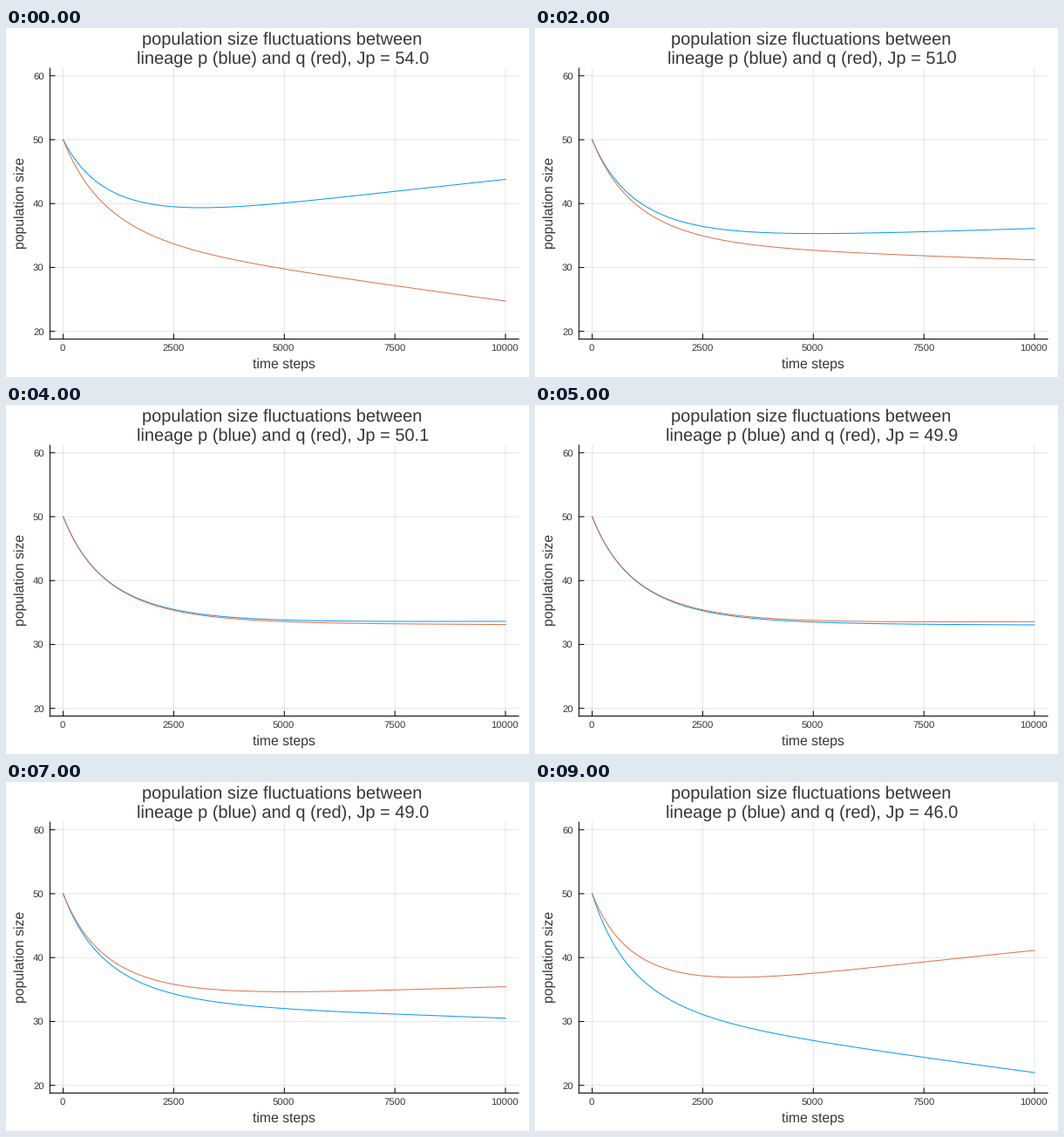
Write a matplotlib script that moves like this. It is 600 px wide and 400 px high and loops after 10000 ms.

```python
import numpy as np
import matplotlib as mpl
import matplotlib.pyplot as plt
from matplotlib.animation import FuncAnimation

mpl.rcParams["font.family"] = "Liberation Sans"
mpl.rcParams["text.hinting"] = "none"

W, H, DPI = 600, 400, 100
PT = 72 / DPI                      # points per pixel
LEFT, RIGHT, TOP, BOTTOM = 50.4, 588.2, 46, 356.5
INK = "#363636"
BLUE, RED = "#009AFA", "#E36F47"

STEPS = 10000
RATE = 7e-4
JQ = 50
JP = np.array([54, 52, 51, 50.5, 50.1, 49.9, 49.5, 49, 48, 46])


def sx(t):
    return 65.6 + 507.4 * np.asarray(t) / STEPS


def sy(n):
    return 128 + (50 - np.asarray(n)) * (BOTTOM - TOP) / 42.4


def simulate():
    """Competing lineages p and q, one column per value of Jp."""
    p = np.full((STEPS + 1, len(JP)), 50.0)
    q = p.copy()
    for i in range(STEPS):
        a, b = p[i], q[i]
        load = a + b - a * b / (a + b)
        p[i + 1] = a + RATE * a * (1 - load / JP)
        q[i + 1] = b + RATE * b * (1 - load / JQ)
    return p[::20], q[::20]


fig = plt.figure(figsize=(W / DPI, H / DPI), dpi=DPI, facecolor="white")
ax = fig.add_axes([0, 0, 1, 1])
ax.set_xlim(0, W)
ax.set_ylim(H, 0)
ax.axis("off")


def line(x, y, color="black", **kw):
    return ax.plot(x, y, color=color, lw=PT, snap=False, **kw)[0]


def label(x, y, s, size, **kw):
    return ax.text(x, y, s, fontsize=size * PT, color=INK,
                   ha="left", va="baseline", **kw)


for t in range(0, STEPS + 1, 2500):
    x = sx(t)
    line([x, x], [TOP, BOTTOM], alpha=0.1)
    line([x, x], [BOTTOM, BOTTOM - 5.5])
    label(round(x - 3.17 * len(str(t)) - 0.8), 370, str(t), 11.4)

for n in range(20, 61, 10):
    y = sy(n)
    line([LEFT, RIGHT], [y, y], alpha=0.1)
    line([LEFT, LEFT + 5.5], [y, y])
    label(31, round(float(y) + 4), str(n), 11.4)

line([LEFT, LEFT], [TOP, BOTTOM + 0.5])
line([LEFT, RIGHT], [BOTTOM, BOTTOM])

label(156, 19, "population size fluctuations between", 20)
label(283, 390, "time steps", 15.7)
label(21, 253, "population size", 15.7, rotation=90, rotation_mode="anchor")

head = label(150, 41, "", 20)
tail = label(467, 41, "", 20)

P, Q = simulate()
times = sx(np.linspace(0, STEPS, len(P)))
blue = line(times, sy(P[:, 0]), BLUE, zorder=3)
red = line(times, sy(Q[:, 0]), RED, zorder=4)


def draw(i):
    blue.set_ydata(sy(P[:, i]))
    red.set_ydata(sy(Q[:, i]))
    text = f"lineage p (blue) and q (red), Jp = {JP[i]:.1f}"
    # tighten the gap between "1" and the decimal point
    tight = "1." in text
    head.set_x(152 if tight else 150)
    head.set_text(text[:-2] if tight else text)
    tail.set_text(text[-2:] if tight else "")
    return blue, red, head, tail


anim = FuncAnimation(fig, draw, frames=len(JP), interval=1000, repeat=True)
plt.show()
```
